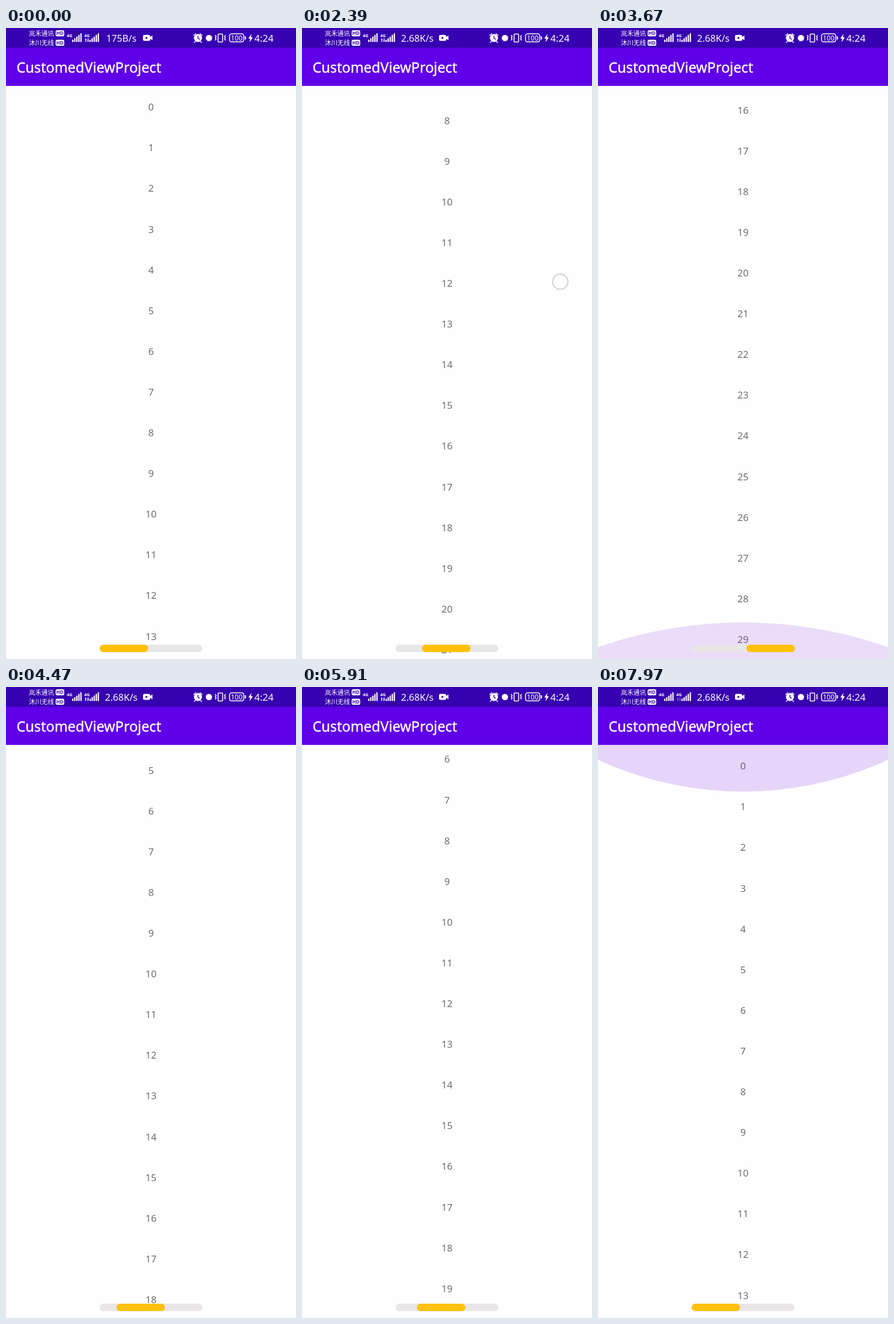
Recreate the animation shown at these times as an HTML page. Size 508 by 1102 pixels, loop 7.99 s.

```html
<!DOCTYPE html>
<html lang="zh">
<head>
<meta charset="utf-8">
<title>CustomedViewProject</title>
<style>
  html, body { margin: 0; width: 100%; height: 100%; overflow: hidden; background: #fefefe; }
  svg { display: block; width: 100vw; height: 100vh; }
  text { font-family: "Noto Sans", "Open Sans", sans-serif; }
  #list text { font-size: 17px; fill: #6e6e6e; text-anchor: middle; }
  #title { font-size: 24.7px; fill: #fff; stroke: #fff; stroke-width: .4; }
  #status text { fill: #fff; }
  #status .carrier { font: 11px "Noto Sans CJK SC", "Noto Sans CJK", sans-serif; }
  #status .net { font-size: 7.5px; font-weight: 700; }
  #status .badge { font-size: 8.5px; font-weight: 800; fill: #3700b0; text-anchor: middle; }
  .line { fill: none; stroke: #fff; stroke-width: 1.6; stroke-linecap: round; stroke-linejoin: round; }
</style>
</head>
<body>
<svg viewBox="0 0 508 1102" preserveAspectRatio="none">
  <rect width="508" height="1102" fill="#fefefe"/>
  <g id="list"></g>
  <ellipse id="topGlow" cx="254" fill="#7000e0"/>
  <ellipse id="bottomGlow" cx="254" fill="#7000e0"/>

  <rect x="164" y="1077" width="180" height="13" rx="6.5" fill="#e8e6e7"/>
  <rect id="thumb" y="1077" width="85" height="13" rx="6.5" fill="#ffc10a"/>

  <rect y="101" width="508" height="1" fill="#6000e8" opacity=".14"/>
  <rect y="34" width="508" height="67" fill="#6000e8"/>
  <rect width="508" height="34.5" fill="#3700b0"/>
  <text id="title" x="18.5" y="77.5">CustomedViewProject</text>

  <g id="status" fill="#fff">
    <text class="carrier" x="40" y="13.5">岚禾通讯</text>
    <text class="carrier" x="40" y="30">沐川无线</text>
    <rect x="87" y="4" width="15" height="10.5" rx="2.5"/>
    <rect x="87" y="20.5" width="15" height="10.5" rx="2.5"/>
    <text class="badge" x="94.5" y="12.3">HD</text>
    <text class="badge" x="94.5" y="28.8">HD</text>
    <text class="net" x="106.5" y="16">4G</text>
    <text class="net" x="137" y="16">4G</text>
    <g id="bars"></g>
    <path id="arrows" d="M138 20.5l1.7-2.5 1.7 2.5h-1v4h-1.4v-4zM142 22l1.7 2.5 1.7-2.5h-1v-4h-1.4v4z"/>
    <text id="speed" x="202" y="24" font-size="16.5" text-anchor="middle"></text>

    <rect x="240" y="12" width="12.5" height="10.5" rx="2.5"/>
    <path d="M252 16l4.5-3v8.5l-4.5-3z"/>
    <circle cx="246" cy="17.2" r="1.8" fill="#3700b0"/>

    <circle cx="336.3" cy="17.5" r="7"/>
    <path class="line" d="M329 13l3.5-3M343.5 13l-3.5-3M331.5 24l-1.5 1M341 24l1.5 1"/>
    <path d="M336.3 13.5v4.3l3 2" fill="none" stroke="#3700b0" stroke-width="1.5"/>

    <circle cx="355.5" cy="17.5" r="5.5"/>

    <rect class="line" x="371.5" y="10.5" width="8" height="14" rx="1.5"/>
    <path class="line" d="M366.8 13l1.2 2-1.2 2 1.2 2-1.2 2M384.2 13l-1.2 2 1.2 2-1.2 2 1.2 2"/>

    <rect class="line" x="391.5" y="10.3" width="25" height="14" rx="3.5"/>
    <rect x="418.3" y="14.3" width="2" height="6" rx="1"/>
    <text x="404" y="21.8" font-size="12" text-anchor="middle">100</text>
    <path d="M430 10l-5.5 8.5h3.3l-1.3 6.5 6-8.8h-3.5z"/>
    <text x="435" y="24" font-size="17">4:24</text>
  </g>
  <circle id="touch" r="13.3" fill="#fff" fill-opacity=".6" stroke="#50389c" stroke-opacity=".26" stroke-width="2"/>
</svg>
<script>
const LOOP = 7990, PITCH = 71.1, MAX_SCROLL = 1132.1;
const PRESS = 250;                 // finger rests this long before it moves
const DECAY = 350;                 // fling time constant
const RISE = 160, RECEDE = 600;    // edge glow timing
const RADIUS = 609.6, GLOW = 81.7;

// Finger gestures; speed is in px per ms, positive scrolls down the list.
const swipes = [
  { at: 530, hold: 870, x: 442.5, y: 739.6, speed: .4694 },
  { at: 2110, hold: 470, x: 452.5, y: 580, speed: .411 },
  { at: 3150, hold: 250, x: 448, y: 700, speed: 1.6 },
  { at: 4055, hold: 280, x: 445, y: 330, speed: -2 },
  { at: 5650, hold: 300, x: 445, y: 750, speed: 1.4 },
  { at: 6420, hold: 440, x: 452.5, y: 876, speed: 1.42 },
  { at: 7252, hold: 280, x: 445, y: 330, speed: -2.4 }
];

const $ = id => document.getElementById(id);
const clamp = (v, lo, hi) => Math.min(hi, Math.max(lo, v));

function set(el, attrs) {
  for (const key in attrs) el.setAttribute(key, attrs[key]);
}
function add(parent, tag, attrs, text = "") {
  const el = document.createElementNS("http://www.w3.org/2000/svg", tag);
  set(el, attrs);
  el.textContent = text;
  parent.append(el);
}

for (let i = 0; i < 30; i++) add($("list"), "text", { x: 254, y: 144.2 + i * PITCH }, i);
for (const x of [115.8, 146.2])
  for (let i = 0; i < 5; i++) {
    const height = 4 + i * 2.8;
    add($("bars"), "rect", { x: x + i * 3.6, y: 24.5 - height, width: 2.3, height, rx: .8 });
  }

const dragged = (s, t) => s.speed * clamp(t - s.at, 0, s.hold);

// Only quick swipes carry on after release.
function flung(s, t) {
  const age = t - s.at - s.hold;
  if (age < 0 || Math.abs(s.speed) < 1) return 0;
  return s.speed * DECAY * (1 - Math.exp(-age / DECAY));
}

function scrollAt(t) {
  return swipes.reduce((pos, s) => clamp(pos + dragged(s, t) + flung(s, t), 0, MAX_SCROLL), 0);
}

// Moments when the list runs into the given end.
function findHits(end) {
  const hits = [];
  for (let t = 1; t < LOOP; t++)
    if (scrollAt(t) === end && scrollAt(t - 1) !== end) hits.push(t);
  return hits;
}
const topHits = findHits(0), bottomHits = findHits(MAX_SCROLL);

function glowSize(hits, t) {
  const age = t - Math.max(...hits.filter(h => h <= t));
  if (age < RISE) return Math.sin(age / RISE * Math.PI / 2);
  return clamp(1 - (age - RISE) / RECEDE, 0, 1) ** 2;
}

function drawGlow(el, size, edge, dir) {
  set(el, {
    cy: edge + dir * (GLOW - RADIUS) * size,
    rx: RADIUS,
    ry: RADIUS * size,
    opacity: Math.min(.16, .17 * size)
  });
}

// Even motion samples shown at an uneven 20, 20, 100 ms beat.
function sample(t) {
  if (t < 530) return t < 130 ? 0 : 280;
  const phase = (t - (t < 3630 ? 530 : 3630)) % 140;
  const step = Math.min(2, Math.floor(phase / 20));
  return t - phase + step * 140 / 3;
}

function draw(now) {
  const t = sample(now % LOOP), scroll = scrollAt(t);
  set($("list"), { transform: `translate(0 ${-scroll})` });
  set($("thumb"), { x: 164 + scroll / MAX_SCROLL * 96 });
  drawGlow($("topGlow"), glowSize(topHits, t), 101, 1);
  drawGlow($("bottomGlow"), glowSize(bottomHits, t), 1102, -1);

  const held = swipes.find(s => t >= s.at - PRESS && t <= s.at + s.hold);
  set($("touch"), { visibility: held ? "visible" : "hidden" });
  if (held) set($("touch"), { cx: held.x, cy: held.y - dragged(held, t) });

  $("speed").textContent = t < 1700 ? "175B/s" : "2.68K/s";
  set($("arrows"), { opacity: t < 6000 ? 1 : .4 });
}

const start = performance.now();
function tick() {
  draw(performance.now() - start);
  requestAnimationFrame(tick);
}
tick();
</script>
</body>
</html>
```
